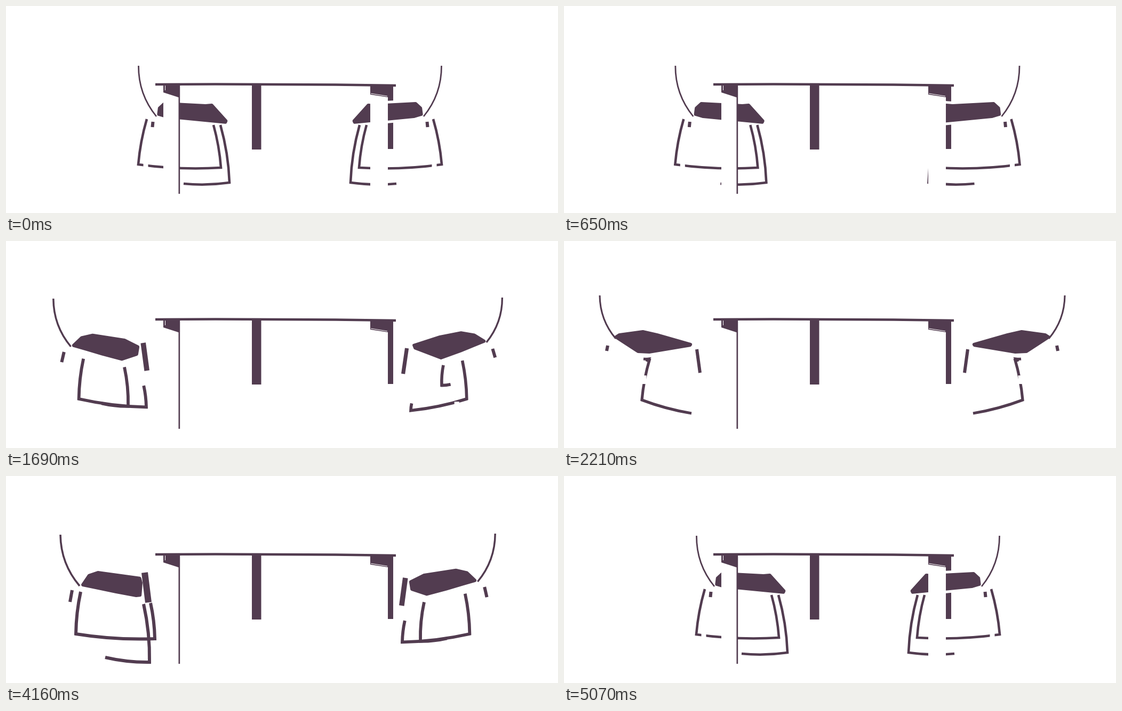
Recreate the animation shown at these times as an HTML page with a canvas. Size 1035x388 px, loop 5330 ms.

```html
<!DOCTYPE html>
<html lang="en">
<head>
<meta charset="utf-8">
<title>Chairs and table</title>
<style>
  html, body { margin: 0; width: 100%; height: 100%; overflow: hidden; background: #fff; }
  canvas { display: block; }
</style>
</head>
<body>
<canvas id="stage" width="1035" height="388"></canvas>
<script>
const ctx = document.getElementById('stage').getContext('2d');
const INK = '#523c50', PAPER = '#fff';
const STEP = 130, STEPS = 41, REST = 7;

// Key joints of the left chair; the right one is its mirror image.
// The far frame runs rear top, rear foot, front foot, front top;
// the near frame runs bar end, foot, top.
const facing = {
  line: 4.6, tagTilt: -1, tagLength: 10, postWidth: 1,
  back: [[248.5, 112], [282, 207]],
  seat: [[283, 205], [285, 190], [296, 180], [374, 184], [387, 183], [416, 215], [413, 221], [300, 210]],
  far: [[264, 212], [248, 297], [403, 303], [389, 223]],
  near: [[333, 333], [419, 331], [402, 223]],
  post: [[340, 200], [345, 200]],
  tag: [275.5, 217], gap: [262, 299]
};
const turning = {
  line: 6, tagTilt: -4, tagLength: 22, postWidth: 12,
  back: [[102, 110], [138, 206]],
  seat: [[139, 206], [154, 184], [172, 178], [253, 189], [256, 200], [254, 226], [244, 227], [206, 220]],
  far: [[140, 217], [131, 296], [279, 305], [271, 238]],
  near: [[186, 340], [269, 349], [258, 240]],
  post: [[260, 181], [267, 237]],
  tag: [124, 214], gap: [120, 330]
};
const angled = {
  line: 5.5, tagTilt: -5, tagLength: 15, postWidth: 6,
  back: [[69, 105], [97, 186]],
  seat: [[94, 184], [120, 171], [148, 167], [178, 174], [242, 192], [238, 197], [177, 221], [140, 206]],
  far: [[153, 226], [145, 296], [239, 321], [239, 321]],
  near: [[169, 251], [169, 251], [168, 231]],
  post: [[253, 206], [260, 252]],
  tag: [86, 199], gap: [171, 304]
};
const sideways = {
  line: 5.2, tagTilt: -2, tagLength: 10, postWidth: 6,
  back: [[67, 102], [97, 183]],
  seat: [[92, 180], [103, 173], [148, 167], [175, 173], [242, 192], [238, 198], [160, 211], [138, 210]],
  far: [[161, 220], [146, 298], [239, 323], [239, 323]],
  near: [[149, 221], [158, 221], [155, 226]],
  post: [[249, 203], [255, 247]],
  tag: [82, 196], gap: [150, 260]
};

const smooth = t => {
  t = Math.min(1, Math.max(0, t));
  return t * t * (3 - 2 * t);
};

// Blends numbers, lists and objects of the same structure.
function mix(a, b, t) {
  if (typeof a === 'number') return a + (b - a) * t;
  if (Array.isArray(a)) return a.map((v, i) => mix(v, b[i], t));
  return Object.fromEntries(Object.keys(a).map(key => [key, mix(a[key], b[key], t)]));
}

// Joins points with segments that bulge in proportion to their length.
function brush(points, width, bulge = 0) {
  ctx.beginPath();
  ctx.moveTo(...points[0]);
  for (let i = 1; i < points.length; i++) {
    const [x0, y0] = points[i - 1], [x1, y1] = points[i];
    ctx.quadraticCurveTo(
      (x0 + x1) / 2 - (y1 - y0) * bulge * 2,
      (y0 + y1) / 2 + (x1 - x0) * bulge * 2, x1, y1);
  }
  ctx.strokeStyle = INK;
  ctx.lineWidth = width;
  ctx.stroke();
}

function roundedShape(points, radius) {
  const last = points.at(-1), first = points[0];
  ctx.beginPath();
  ctx.moveTo((last[0] + first[0]) / 2, (last[1] + first[1]) / 2);
  points.forEach((p, i) => ctx.arcTo(...p, ...points[(i + 1) % points.length], radius));
  ctx.closePath();
}

function rect(x, y, width, height, color = INK) {
  ctx.fillStyle = color;
  ctx.fillRect(x, y, width, height);
}

function drawChair({ line, tagTilt, tagLength, postWidth, back, seat, far, near, post, tag, gap }) {
  roundedShape(seat, 3);
  ctx.strokeStyle = PAPER;
  ctx.lineWidth = 10;
  ctx.stroke();
  ctx.fillStyle = INK;
  ctx.fill();

  brush(back, line * 0.6, 0.09);
  brush(far, line, 0.025);
  brush(near, line, 0.03);
  brush(post, postWidth);
  brush([tag, [tag[0] + tagTilt, tag[1] + tagLength]], 6);
  rect(gap[0] - 4.5, gap[1] - 8, 9, 16, PAPER);
}

// Poses count from 1, just turned, to the resting side view.
const turnedChair = pose => pose === REST ? sideways : mix(turning, angled, (pose - 1) / 5);

function placeChair(step, { mirrored, slide, turnAt, returnAt, reach }) {
  let pose = 0, shift = 0;
  if (step < turnAt) shift = slide(step);
  else if (step < returnAt) pose = Math.min(REST, step - turnAt + 1);
  else if (step < returnAt + 4) pose = Math.round(6 - (step - returnAt) * 5 / 3);
  else shift = reach * Math.cos(Math.PI / 12 * Math.min(6, step - 33));

  ctx.save();
  if (mirrored) {
    ctx.translate(pose ? 1006 : 1065, 0);
    ctx.scale(-1, 1);
  }
  ctx.translate(-shift, 0);
  drawChair(pose ? turnedChair(pose) : facing);
  ctx.restore();
}

const leftChair = {
  mirrored: false, turnAt: 11, returnAt: 29, reach: 130,
  slide: step => 140 * smooth((step - 1.7) / 9.4)
};
const rightChair = {
  mirrored: true, turnAt: 9, returnAt: 30, reach: 75,
  slide: step => 75 * smooth(step / 10)
};

function drawBackLegs() {
  rect(461, 148, 17.5, 121);
  rect(716, 150, 10, 118);
}

// A white front leg with the dark slanted bracket at its top.
function drawFrontLeg(x, width, bracketWidth, leftY, rightY) {
  rect(x, 150, width, 203, PAPER);
  ctx.beginPath();
  ctx.moveTo(x, 148);
  ctx.lineTo(x + bracketWidth, 148);
  ctx.lineTo(x + bracketWidth, rightY);
  ctx.lineTo(x, leftY);
  ctx.fillStyle = INK;
  ctx.fill();
}

function drawTable() {
  drawFrontLeg(295, 29, 31, 162, 172);
  drawFrontLeg(683, 33, 33, 166, 171);
  rect(323.5, 148, 2.7, 204);
  rect(298, 149, 1, 9, PAPER);
  ctx.beginPath();
  ctx.moveTo(684, 164);
  ctx.lineTo(715, 169);
  ctx.strokeStyle = PAPER;
  ctx.lineWidth = 1;
  ctx.stroke();
  brush([[280, 147], [505, 147], [731, 149]], 4.5, -0.002);
}

function frame(now) {
  const step = Math.floor(now / STEP) % STEPS;
  rect(0, 0, 1035, 388, PAPER);
  drawBackLegs();
  placeChair(step, leftChair);
  placeChair(step, rightChair);
  drawTable();
  requestAnimationFrame(frame);
}

requestAnimationFrame(frame);
</script>
</body>
</html>
```
